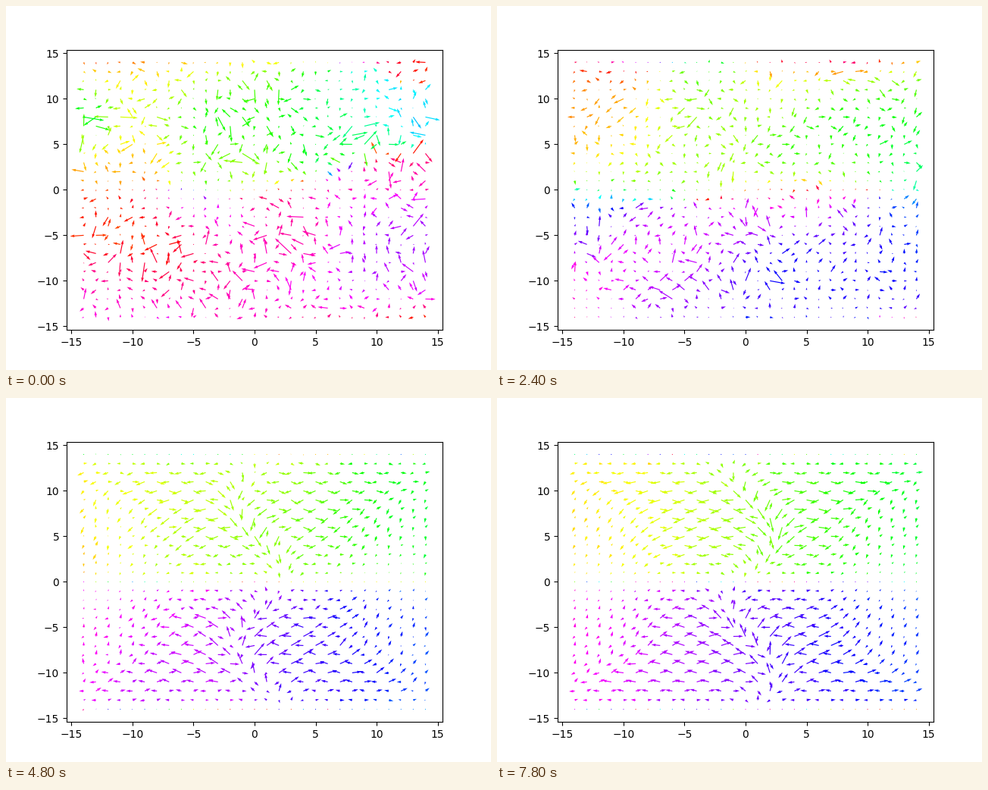
Write a matplotlib script that moves like this. It is 640 by 480 pixels and loops after 8000 ms.

```python
import numpy as np
import matplotlib.pyplot as plt
from matplotlib.animation import FuncAnimation

FRAMES, STEP = 40, 200
axis = np.arange(-14, 15)
X, Y = np.meshgrid(axis, axis)
HEIGHT = np.abs(Y)
SIGN = 1 - 2 * ((X + Y) % 2)
rng = np.random.default_rng(7)


def sigmoid(z):
    return 1 / (1 + np.exp(-z))


def noise(passes):
    """Complex random field, averaged with its neighbours, of unit strength."""
    f = rng.normal(size=X.shape) + 1j * rng.normal(size=X.shape)
    for _ in range(passes):
        p = np.pad(f, 1, mode="edge")
        f = f / 2 + (p[2:, 1:-1] + p[:-2, 1:-1] + p[1:-1, 2:] + p[1:-1, :-2]) / 8
    return f / np.sqrt(np.mean(np.abs(f) ** 2))


def drifting(passes, keep):
    """One noise field per frame, each remembering part of the last."""
    f, fields = noise(passes), []
    for _ in range(FRAMES):
        fields.append(f)
        f = keep * f + np.sqrt(1 - keep ** 2) * noise(passes)
    return fields


PATCHES = drifting(30, .8)
GRAIN = drifting(1, .75)

# Settled state: one lobe above and one below the middle row
BAND = np.abs(np.sin(np.pi * HEIGHT / 14)) ** .65
DOME = sigmoid((8 + 8 * sigmoid(HEIGHT - 10) - np.abs(X)) / 1.2)
SIZE = .04 + .96 * BAND * (.33 + .67 * DOME)
LEAN = np.where(Y >= 0, -1, 1) * (np.pi / 2 - .05 * X)


def field(n):
    heat = np.exp(-(n / 17) ** 2)
    patch = PATCHES[n]

    # Smooth part, which also sets the colour
    rest = BAND * np.exp(1j * (LEAN + .6 * np.exp(-n / 4)))
    mean = rest + (.03 + .5 * heat) * patch + .05 * GRAIN[n]

    # Alternating part, turning through the vertical at a drifting wall
    wall = .5 + 2 * np.sin(.3 * n + .4 * Y)
    angle = np.pi * sigmoid((wall - X) / .9) + 1.1 * (1 - DOME)
    calm = (1 - heat) * SIZE * np.exp(1j * angle)
    wild = heat * (.25 + .4 * BAND) * (.4 + .6 * np.abs(patch)) * GRAIN[n]
    arrow = SIGN * (.9 * calm + wild + .06 * SIZE * GRAIN[n])
    arrow = arrow + .34 * mean * (heat * .6 + (1 - heat) * SIZE)
    return arrow.real, arrow.imag, np.angle(mean)


fig, ax = plt.subplots(figsize=(6.4, 4.8), dpi=100)
ax.set_xlim(-15.4, 15.4)
ax.set_ylim(-15.4, 15.4)
quiver = ax.quiver(X, Y, *field(0), cmap="hsv", scale=31)
quiver.set_clim(-np.pi, np.pi)


def update(n):
    quiver.set_UVC(*field(n))
    return quiver,


anim = FuncAnimation(fig, update, frames=FRAMES, interval=STEP,
                     repeat=True, repeat_delay=0)
plt.show()
```
